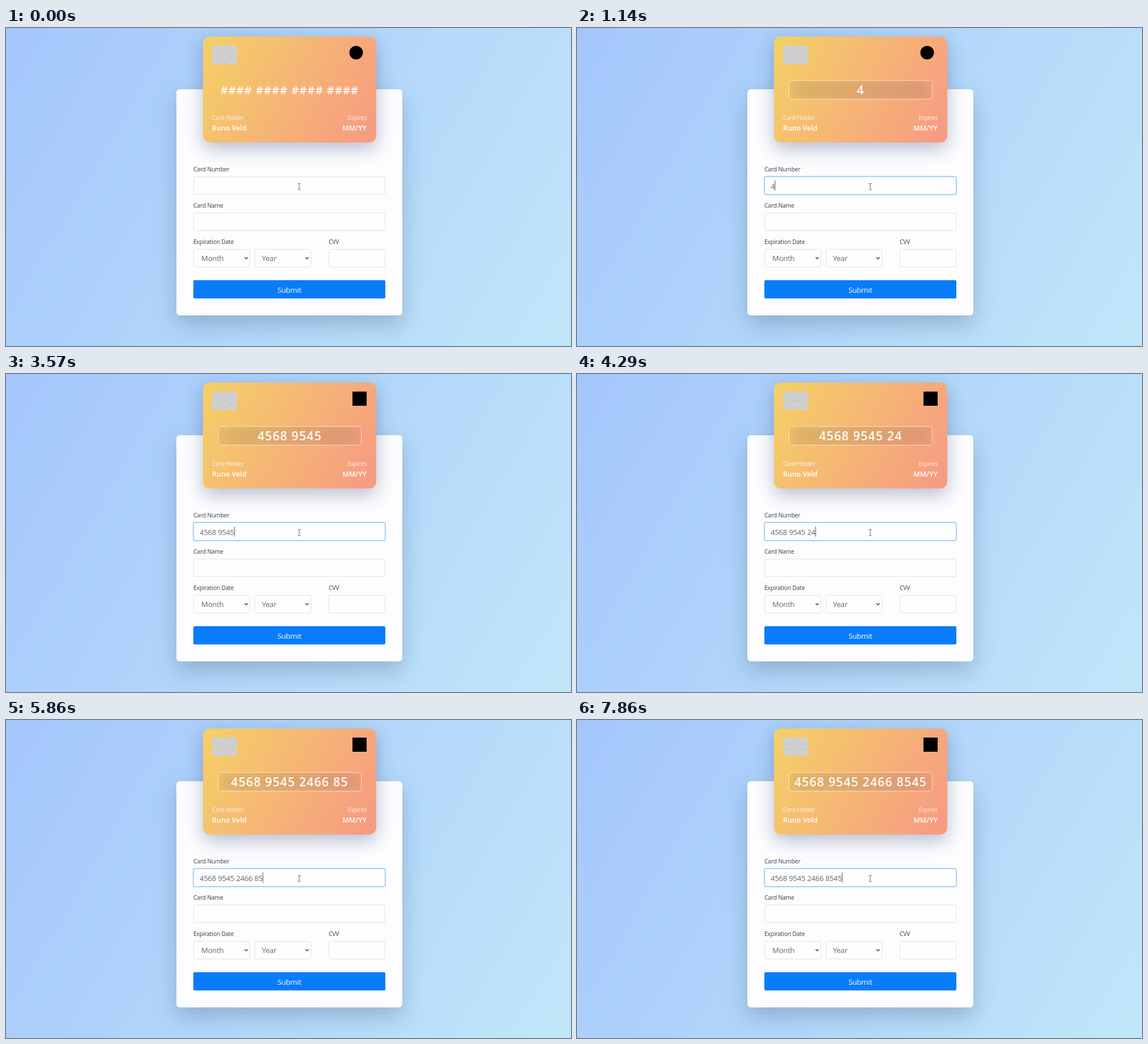
Animation, 998 px wide and 561 px high, one loop 8 s. Source, as an HTML page:

```html
<!DOCTYPE html>
<html lang="en">
<head>
<meta charset="utf-8">
<title>Card form</title>
<style>
html, body { margin: 0; width: 100%; height: 100%; overflow: hidden; }
body { position: relative; background: linear-gradient(120deg, #a4c6fc, #c0e7f9); }
div, svg { position: absolute; box-sizing: border-box; }

.form {
  left: 301px; top: 108px; width: 399px; height: 399px;
  border-radius: 6px; background: #fdfdff;
  box-shadow: 0 16px 38px rgba(90, 116, 148, .4);
}
.card {
  left: 348px; top: 15px; width: 305.5px; height: 186.5px;
  border-radius: 12px;
  background: linear-gradient(120deg, #f4d166, #f79984);
  box-shadow: 0 11px 32px rgba(20, 42, 85, .3);
}
.ring {
  left: 26px; top: 77px; width: 254px; height: 34px;
  border: 1.5px solid rgba(255, 255, 255, .55);
  border-radius: 5px; overflow: hidden;
  animation: ring 8s infinite;
}
.ring::after {
  content: ""; position: absolute; inset: 0;
  background: #08142f; filter: blur(16px); opacity: .14;
}
@keyframes ring {
  0%, 1.75% {
    left: 0; top: 0; width: 305.5px; height: 186.5px; opacity: 0;
    animation-timing-function: cubic-bezier(.71, .03, .56, .85);
  }
  6.125%, 100% { left: 26px; top: 77px; width: 254px; height: 34px; opacity: 1; }
}

.field { height: 32px; border: 1px solid #dfe2e9; border-radius: 3px; background: #fefeff; }
.number { left: 331px; top: 262px; width: 339px; animation: focus 8s infinite; }
.name { left: 331px; top: 326px; width: 339px; }
.month { left: 331px; top: 389.5px; width: 100px; }
.year { left: 438.5px; top: 389.5px; width: 100px; }
.cvv { left: 570px; top: 389.5px; width: 100px; }
@keyframes focus {
  0%, 1.75% { border-color: #dfe2e9; box-shadow: 0 0 1px 1px rgba(0, 123, 255, 0); }
  3.6%, 100% { border-color: #a3d0fd; box-shadow: 0 0 1px 1px rgba(0, 123, 255, .35); }
}
.button {
  left: 331px; top: 445px; width: 339px; height: 32px;
  border-radius: 3px; background: #097cfb; box-shadow: 0 0 1px #097cfb;
}

svg { left: 0; top: 0; }
text { font-family: "Open Sans", "Noto Sans", sans-serif; letter-spacing: -.02em; white-space: pre; }
.label { font-size: 10.4px; fill: #3a3d42; }
.input { font-size: 13.2px; fill: #62676e; }
.soft { font-size: 10.4px; fill: #fff; opacity: .85; }
.strong { font-size: 12.5px; font-weight: 600; fill: #fff; letter-spacing: 0; }
.digits { font-size: 21.5px; font-weight: 600; fill: #fff; letter-spacing: 1.1px; }
.digits.empty { font-size: 20.1px; }
.end { text-anchor: end; }
.mid { text-anchor: middle; }
</style>
</head>
<body>
<div class="form"></div>
<div class="card"><div class="ring"></div></div>
<div class="field number"></div>
<div class="field name"></div>
<div class="field month"></div>
<div class="field year"></div>
<div class="field cvv"></div>
<div class="button"></div>

<svg width="998" height="561" viewBox="0 0 998 561">
  <!-- chip -->
  <rect x="364" y="31" width="44" height="32" rx="2" fill="#d0d0d0"/>
  <path d="M364 42h13q3 0 3 5t-3 5h-13M408 42h-13q-3 0-3 5t3 5h13M380 47h12M386 31v7h-6v4M386 63v-8"
        fill="none" stroke="#c3c3c3" stroke-width=".8"/>
  <!-- card type -->
  <circle id="round" cx="618.5" cy="43.5" r="12"/>
  <rect id="square" x="612" y="31" width="25" height="25"/>

  <text id="digits" class="digits mid" x="501" y="116.5"></text>
  <text class="soft" x="364" y="162">Card Holder</text>
  <text class="strong" x="364" y="180.5">Runo Veld</text>
  <text class="soft end" x="637" y="162">Expires</text>
  <text class="strong end" x="637" y="180.5">MM/YY</text>

  <text class="label" x="331" y="253">Card Number</text>
  <text class="label" x="331" y="317">Card Name</text>
  <text class="label" x="331" y="380.5">Expiration Date</text>
  <text class="label" x="570" y="380.5">CVV</text>
  <text class="input" x="345" y="411">Month</text>
  <text class="input" x="452" y="411">Year</text>
  <path d="M421.5 404.5l2.8 2.8 2.8-2.8M529 404.5l2.8 2.8 2.8-2.8" fill="none" stroke="#44484e" stroke-width="1.5"/>
  <text class="input mid" x="500.5" y="466.5" style="fill:#fff">Submit</text>

  <text id="typed" class="input" x="342" y="283.5"></text>
  <rect id="caret" y="269" width="1" height="18" fill="#50555c"/>
  <!-- pointer -->
  <path d="M515.5 274.5h2l.5.5.5-.5h2M515.5 285h2l.5-.5.5.5h2M518 275v9.5" fill="none" stroke="#5c6066"/>
</svg>

<script>
const LOOP = 8000, FOCUS = 135, BLINK = 560;
const cardNumber = "4568 9545 2466 8545";
// Times of the key presses, one per digit
const presses = [1135, 1425, 1855, 2285, 2705, 2995, 3285, 3565,
                 3995, 4285, 4705, 5135, 5565, 5855, 6425, 6855];
const $ = id => document.getElementById(id);
const [digits, typed, caret, round, square] =
  ["digits", "typed", "caret", "round", "square"].map($);

const show = (el, on) => { el.style.visibility = on ? "visible" : "hidden"; };
const setText = (el, s) => { if (el.textContent !== s) el.textContent = s; };

function render(t) {
  const count = presses.filter(p => p <= t).length;
  const value = cardNumber.slice(0, count + Math.max(0, Math.ceil(count / 4) - 1));
  setText(digits, value || "#### #### #### ####");
  digits.classList.toggle("empty", !value);
  setText(typed, value);

  const age = t - (count ? presses[count - 1] : FOCUS);
  caret.setAttribute("x", 342 + (value ? typed.getComputedTextLength() : 0));
  show(caret, age >= 0 && age % 1000 < BLINK);

  const known = t >= 1285;
  show(round, !known);
  show(square, known);
}

let start;
function tick(now) {
  start ??= now;
  render((now - start) % LOOP);
  requestAnimationFrame(tick);
}
render(0);
requestAnimationFrame(tick);
</script>
</body>
</html>
```
